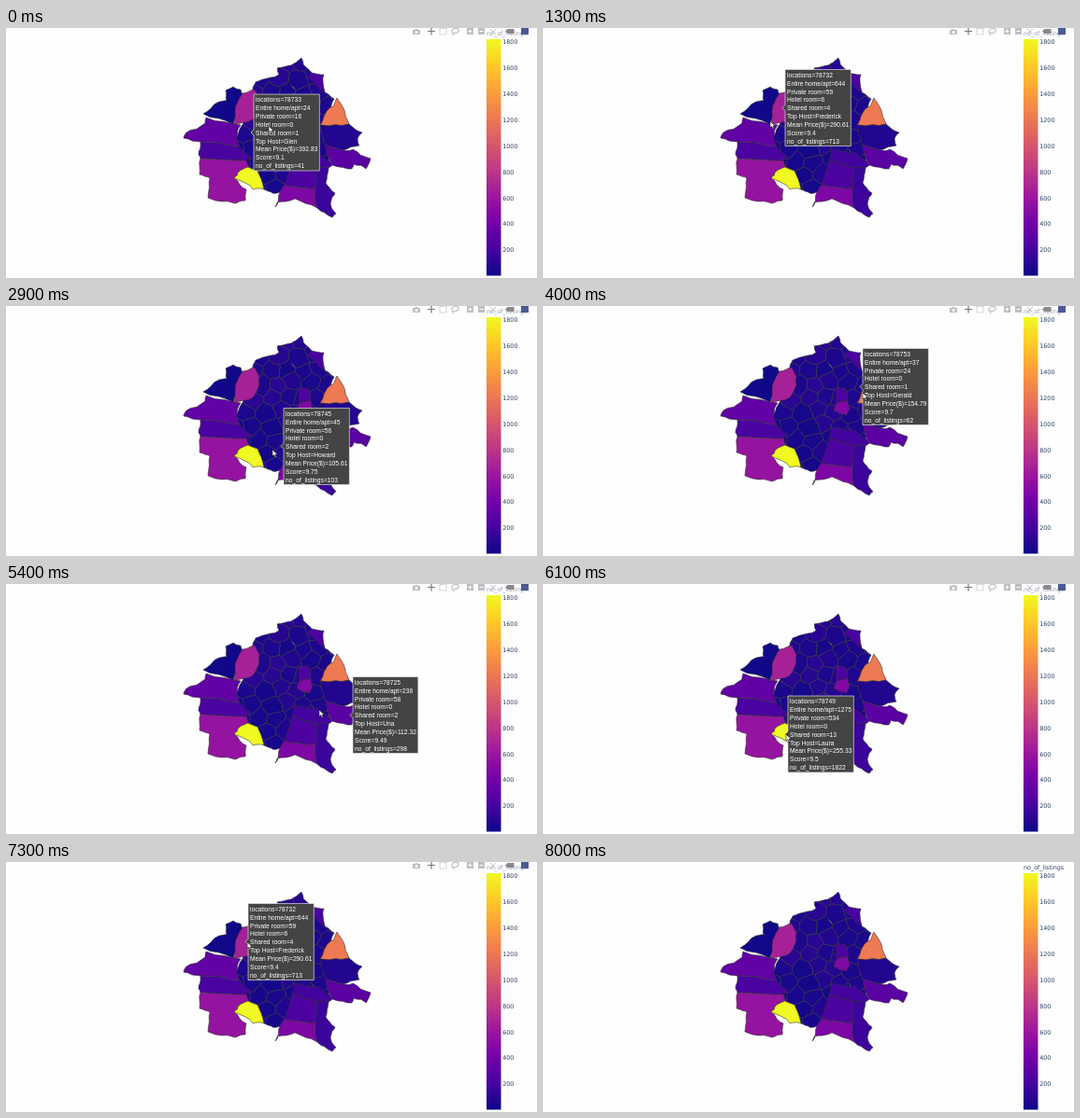
An HTML page for the animation above (8600 ms loop, 568 px wide and 268 px high).

```html
<!DOCTYPE html>
<html lang="en">
<head>
<meta charset="utf-8">
<title>Listings by zip code</title>
<style>
html, body { margin: 0; width: 100%; height: 100%; overflow: hidden; background: #fefefe; }
svg { display: block; }
.axis { font: 6.4px "DejaVu Sans", sans-serif; fill: #2a3f5f; }
#map polygon { stroke: #333; stroke-width: .6; stroke-linejoin: round; }
#tip text { font: 6.7px "Liberation Sans", Arial, sans-serif; fill: #fff; }
#tip path { fill: #444; stroke: #f4f4f4; stroke-width: .6; }
#bar { fill: none; stroke: #bfbfc3; stroke-width: 1.2; }
</style>
</head>
<body>
<svg width="568" height="268" viewBox="0 0 568 268">
  <defs>
    <linearGradient id="scale" x1="0" y1="1" x2="0" y2="0"></linearGradient>
    <clipPath id="core"></clipPath>
  </defs>
  <g id="map"><g id="cells" clip-path="url(#core)"></g></g>
  <rect x="514" y="12" width="15.500" height="253.500" fill="url(#scale)"/>
  <g id="ticks" class="axis"></g>
  <text id="title" class="axis" x="514" y="8">no_of_listings</text>
  <g id="bar">
    <path d="M435 2h2l1-1h2l1 1h2v5h-8z" fill="#bfbfc3" stroke="none"/>
    <circle cx="439" cy="4.4" r="1.5" fill="#fefefe" stroke="none"/>
    <path d="M451 3.5h8M455 0v7.5" stroke="#77777b"/>
    <path d="M464 .5h7v6.5h-7z" stroke-dasharray="1.3 1"/>
    <path d="M478 6c-2-2-1-5 2-5.5s5 1 4 3-4 2.5-5 1.5M478 5.5l1 2.5"/>
    <path d="M493 0h7v7h-7zM505 0h7v7h-7z" fill="#bfbfc3" stroke="none"/>
    <path d="M494.5 3.5h4M496.5 1.5v4M506.5 3.5h4" stroke="#fefefe" stroke-width="1"/>
    <path d="M518 1l6 6M524 1l-6 6" stroke-width=".9"/>
    <path d="M534 3.5l2.500-2.500h7v5h-7z" fill="#88888c" stroke="none"/>
    <rect x="551" width="8" height="7" fill="#4a5b96" stroke="none"/>
  </g>
  <g id="tip"><path/></g>
  <path id="cursor" d="M0 0v7l1.7-1.5 1.3 2.8 1.2-.6-1.2-2.6h2.3z" fill="#fff" stroke="#111" stroke-width=".6"/>
</svg>
<script>
const $ = id => document.getElementById(id);
const add = (parent, tag, attrs, text) => {
  const el = document.createElementNS("http://www.w3.org/2000/svg", tag);
  for (const k in attrs) el.setAttribute(k, attrs[k]);
  if (text) el.textContent = text;
  return parent.appendChild(el);
};
const noise = n => { const s = Math.sin(n * 12.9898) * 43758.5453; return s - Math.floor(s) - .5; };
const lerp = (a, b, k) => a + (b - a) * k;

// Colour scale
const plasma = ["0d0887", "46039f", "7201a8", "9c179e", "bd3786", "d8576b", "ed7953", "fb9f3a", "fdca26", "f0f921"];
plasma.forEach((c, i) => add($("scale"), "stop", { offset: i / 9, "stop-color": "#" + c }));
for (let v = 200; v <= 1800; v += 200)
  add($("ticks"), "text", { x: 531.2, y: 268.2 - v * .13935 }, String(v));

const color = count => {
  const p = Math.min(count / 1822, .9999) * 9, i = Math.floor(p);
  const part = (c, k) => parseInt(c.slice(k, k + 2), 16);
  return `rgb(${[0, 2, 4].map(k => Math.round(lerp(part(plasma[i], k), part(plasma[i + 1], k), p - i)))})`;
};

// Ragged borders: the shift depends on the edge alone, so neighbours share it
const parse = text => text.split(" ").map(p => p.split(",").map(Number));
const rough = (pts, depth = 2) => {
  if (!depth) return pts;
  return rough(pts.flatMap(([x, y], i) => {
    const [u, v] = pts[(i + 1) % pts.length], amp = Math.min(Math.hypot(u - x, v - y), 14) * .2;
    const seed = x + u + (y + v) * 1.7;
    return [[x, y], [(x + u) / 2 + noise(seed) * amp, (y + v) / 2 + noise(seed + 5) * amp]];
  }), depth - 1);
};

// Inner districts: nearest-point cells of a jittered grid
const core = rough(parse("264,66 267,58 283,53 292,50 290,43 305,40 316,32 318,39 327,48 341,69 351,76 " +
  "345,92 345,145 331,170 297,170 293,176 285,177 276,173 262,160 246,118 255,98"));
add($("core"), "polygon", { points: core.join(" ") });

const seeds = [];
for (let row = 0; row < 10; row++)
  for (let col = 0; col < 7; col++) {
    const n = row * 7 + col;
    seeds.push([246 + col * 18 + row % 2 * 9 + noise(n) * 10, 38 + row * 15 + noise(n + 99) * 9]);
  }

// Keep the part of a polygon that lies nearer to a than to b
const nearer = (pts, a, b) => {
  const side = p => Math.hypot(p[0] - a[0], p[1] - a[1]) ** 2 - Math.hypot(p[0] - b[0], p[1] - b[1]) ** 2;
  return pts.flatMap((p, i) => {
    const q = pts[(i + 1) % pts.length], s = side(p), e = side(q), out = s <= 0 ? [p] : [];
    if (s * e < 0) out.push([0, 1].map(k => lerp(p[k], q[k], s / (s - e))));
    return out;
  });
};
seeds.forEach((seed, i) => {
  const cell = seeds.reduce((pts, other) => other === seed ? pts : nearer(pts, seed, other),
    parse("180,20 400,20 400,220 180,220"));
  add($("cells"), "polygon", { points: rough(cell).join(" "), fill: color(60 + noise(i + 7) * 80) });
});
add($("map"), "polygon", { points: core.join(" "), fill: "none" });

// Outer districts: zip, listings, corners
const regions = {};
for (const row of [
  "78734 10 211,92 228,79 236,78 235,67 243,63 251,66 253,79 243,103",
  "78738 330 190,118 193,112 213,102 214,96 251,104 246,118 250,127 208,122",
  "78736 220 206,136 208,122 250,127 262,139 257,142 208,140",
  "78737 570 208,140 257,142 260,149 244,161 257,173 256,185 245,188 216,182 218,161 207,157",
  "78732 670 253,70 266,66 271,76 271,84 264,98 243,104 245,89",
  "78728 220 327,48 340,50 341,69 322,53",
  "78752 480 314,104 326,101 328,110 325,117 311,112",
  "78751 240 313,88 324,88 326,101 314,104",
  "78754 1220 336,104 342,91 350,84 354,75 361,86 367,103",
  "78724 75 336,104 367,103 381,112 376,119 378,126 360,131 341,124",
  "78725 298 341,124 360,131 371,130 390,140 385,151 372,146 370,151 349,147",
  "78741 190 308,130 333,133 349,147 345,150 333,150 306,142",
  "78744 230 306,142 333,150 331,172 298,168",
  "78749 1822 244,161 249,154 259,149 269,153 276,173 264,173",
  "78747 460 298,168 331,172 333,193 309,183 290,187 288,192 293,176",
  "78719 165 345,150 342,166 352,177 347,188 353,199 349,203 333,193 331,172 333,150"
]) {
  const [zip, count, ...corners] = row.split(" "), pts = parse(corners.join(" "));
  const middle = k => (Math.min(...pts.map(p => p[k])) + Math.max(...pts.map(p => p[k]))) / 2;
  regions[zip] = { count: +count, x: middle(0), y: middle(1) };
  add($("map"), "polygon", { points: rough(pts).join(" "), fill: color(+count) });
}

// Box left and middle, four room counts, host, price, score
const tips = {
  78733: [265, 112, 24, 16, 0, 1, "Glen", 392.83, 9.1],
  78732: [259, 85.5, 644, 59, 6, 4, "Frederick", 290.61, 9.4],
  78745: [297, 150.5, 45, 56, 0, 2, "Howard", 105.61, 9.75],
  78753: [342, 86.5, 37, 24, 0, 1, "Gerald", 154.79, 9.7],
  78725: [371, 140.5, 238, 58, 0, 2, "Una", 112.32, 9.49],
  78746: [289, 122.5, 41, 6, 0, 0, "Lofty", 780.7, 9.24]
};
const guess = zip => {
  const { count, x, y } = regions[zip], shared = Math.ceil(count / 150), home = Math.round(count * .7);
  return [x + 2, y, home, count - home - shared, 0, shared, "Laura", (100 + zip % 50 * 3.17).toFixed(2), 9.5];
};
const labels = ["Entire home/apt", "Private room", "Hotel room", "Shared room", "Top Host", "Mean Price($)", "Score"];
const lines = Array.from({ length: 9 }, () => add($("tip"), "text"));
let shown;
function showTip(zip) {
  if (zip === shown) return;
  shown = zip;
  const [x, mid, ...values] = tips[zip] || guess(zip), top = mid - 41;
  const total = values.slice(0, 4).reduce((a, b) => a + b);
  const texts = [`locations=${zip}`, ...labels.map((label, i) => `${label}=${values[i]}`), `no_of_listings=${total}`];
  lines.forEach((line, i) => {
    line.textContent = texts[i];
    line.setAttribute("x", x + 2);
    line.setAttribute("y", top + 8.3 + i * 8.85);
  });
  const width = Math.max(...lines.map(line => line.getComputedTextLength())) + 4;
  $("tip").firstElementChild.setAttribute("d",
    `M${x - 3} ${mid}l3 -3V${top}h${width}v82h${-width}V${mid + 3}z`);
}

// Time, zip and pointer; without a pointer the middle of the district is used
const visits = [[0, 78733, 281, 105], [1300, 78732, 243, 100], [1800, 78738], [2200, 78737], [2550, 78749],
  [2900, 78745, 285, 154], [3400, 78744], [4000, 78753, 342, 93], [4300, 78753, 344, 94], [4500, 78753, 344, 94],
  [4700, 78754], [5100, 78744], [5400, 78725, 335, 135], [5750, 78747], [6100, 78749], [6400, 78737],
  [6700, 78746, 279, 97], [7200, 78732], [8000, 78733, 281, 105]
].map(([t, zip, x = regions[zip].x, y = regions[zip].y]) => ({ t, zip, x, y }));

function draw(now) {
  const t = Math.floor(now % 8600 / 100) * 100, active = t < 8000;
  for (const id of ["tip", "bar", "cursor"]) $(id).style.display = active ? "" : "none";
  $("title").style.opacity = active ? .5 : 1;
  if (!active) return;
  const i = visits.findIndex(v => v.t > t), a = visits[i - 1], b = visits[i];
  const k = (t - a.t) / (b.t - a.t), ease = k * k * (3 - 2 * k);
  showTip(k < .5 ? a.zip : b.zip);
  $("cursor").setAttribute("transform", `translate(${lerp(a.x, b.x, ease)} ${lerp(a.y, b.y, ease)})`);
}
const start = performance.now();
function tick() {
  draw(performance.now() - start);
  requestAnimationFrame(tick);
}
tick();
</script>
</body>
</html>
```
